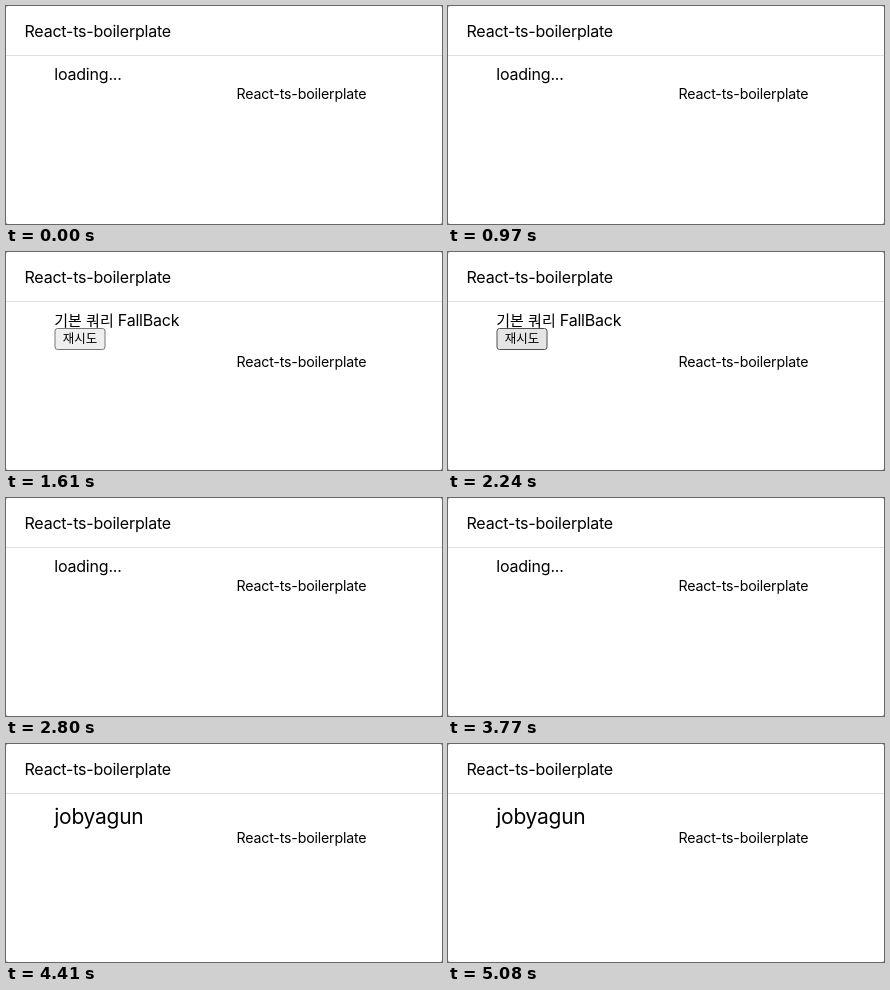
Animation, 436 px wide and 218 px high, one loop 5.53 s. Source, as an HTML page:

```html
<!DOCTYPE html>
<html lang="ko">
<head>
<meta charset="utf-8">
<title>React-ts-boilerplate</title>
<style>
  html, body { margin: 0; width: 100%; height: 100%; overflow: hidden; background: #888; }
  svg { display: block; width: 436px; height: 218px; background: #fff; border-radius: 2px; }
  text { font: 16px Inter, "Noto Sans CJK KR", "Noto Sans CJK", sans-serif; letter-spacing: -.013em; }
  .ko { font: 15px "Noto Sans CJK KR", "Noto Sans CJK", sans-serif; letter-spacing: 0; }
  #label { font-size: 12.5px; }
  #footer { font-size: 14.2px; }
  #user { font-size: 21px; }
</style>
</head>
<body>
<svg viewBox="0 0 436 218">
  <text x="18.5" y="31">React-ts-boilerplate</text>
  <path d="M0 49.5H436" stroke="#dfdfdf"/>
  <text id="loading" x="48.3" y="74">loading...</text>
  <g id="retry">
    <text class="ko" x="48.3" y="74">기본 쿼리</text>
    <text x="111.8" y="74">FallBack</text>
    <rect id="button" x="49" y="76.5" width="50" height="21" rx="2.5"/>
    <text id="label" class="ko" x="56.7" y="91">재시도</text>
  </g>
  <text id="user" x="48.3" y="79.5">jobyagun</text>
  <text id="footer" x="230.5">React-ts-boilerplate</text>
</svg>
<script>
  const LOOP = 5530;
  const views = ['loading', 'retry', 'user'];
  const footerY = { loading: 93, retry: 115, user: 99 };
  const looks = {
    idle: ['#efefef', '#767676'],
    hover: ['#e5e5e5', '#4f4f4f'],
    pressed: ['#f5f5f5', '#8d8d8d'],
  };
  const steps = [
    [0, 'loading'],
    [1610, 'retry', 'idle'],
    [2240, 'retry', 'hover'],
    [2730, 'retry', 'pressed'],
    [2800, 'loading'],
    [4410, 'user'],
  ];
  const byId = id => document.getElementById(id);

  function draw(now) {
    const time = now % LOOP;
    const [, view, look = 'idle'] = steps.findLast(([start]) => start <= time);
    for (const id of views) byId(id).style.display = id === view ? '' : 'none';
    byId('footer').setAttribute('y', footerY[view]);
    const [fill, stroke] = looks[look];
    byId('button').setAttribute('fill', fill);
    byId('button').setAttribute('stroke', stroke);
  }

  const origin = performance.now();
  function tick() {
    draw(performance.now() - origin);
    requestAnimationFrame(tick);
  }
  tick();
</script>
</body>
</html>
```
